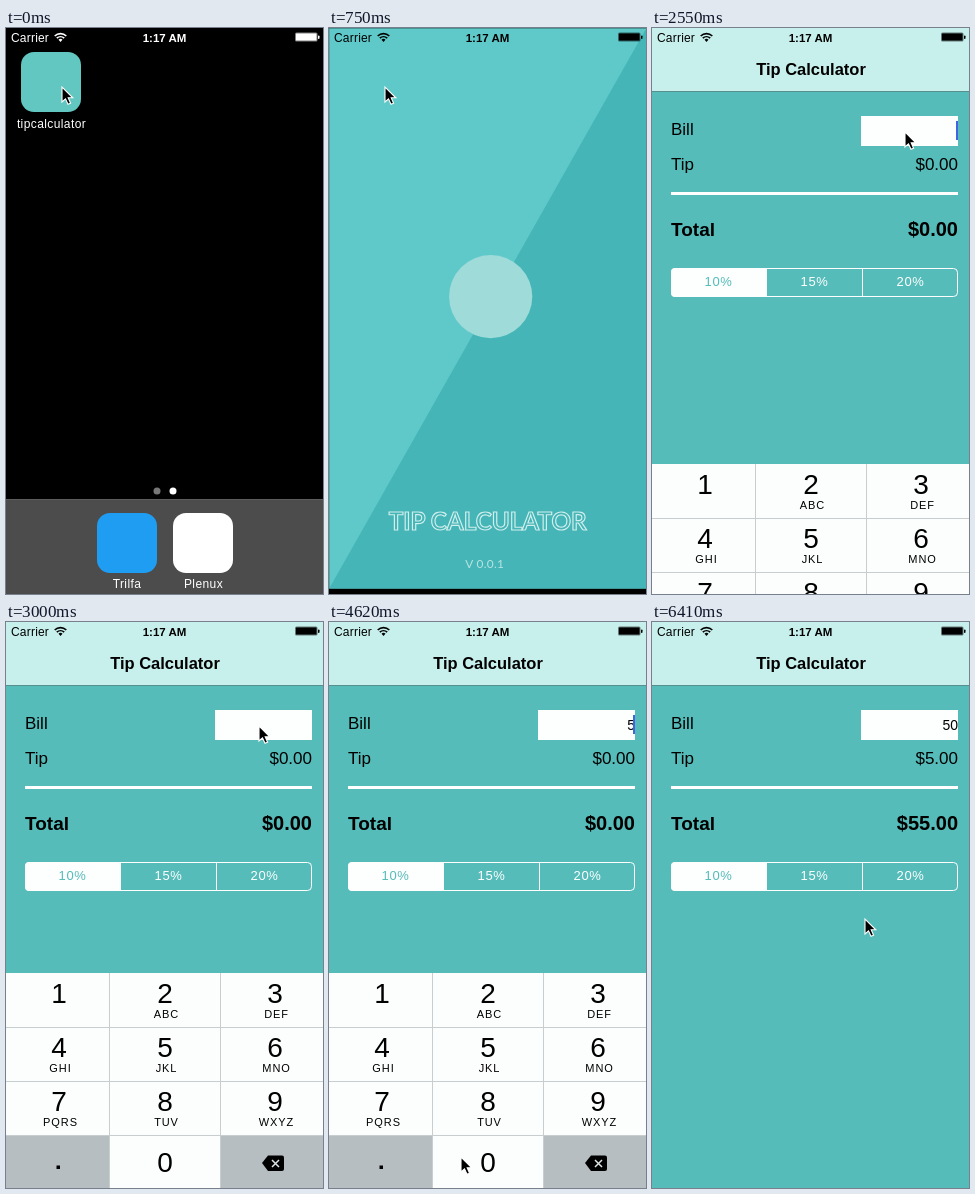
Animation, 317 px wide and 566 px high, one loop 8 s. Source, as an HTML page:

```html
<!DOCTYPE html>
<html lang="en">
<head>
<meta charset="utf-8">
<title>Tip calculator demo</title>
<style>
html, body { margin: 0; width: 100%; height: 100%; overflow: hidden; background: #000; }
svg { display: block; width: 100%; height: 100%; }
text { font-family: "Liberation Sans", Arial, sans-serif; }
.mid { text-anchor: middle; }
.end { text-anchor: end; }
.bold { font-weight: bold; }
.label { font-size: 12px; letter-spacing: .4px; fill: #fff; text-anchor: middle; }
.row { font-size: 17px; }
.seg { font-size: 13px; letter-spacing: .6px; fill: #fff; text-anchor: middle; }
.splash { font-family: Lato, sans-serif; text-anchor: middle; }
.digit { font-size: 28px; text-anchor: middle; }
.letters { font-size: 11px; letter-spacing: .9px; text-anchor: middle; }
</style>
</head>
<body>
<svg viewBox="0 0 317 566">
  <rect width="317" height="566"/>

  <g id="home">
    <rect id="icon" x="15" y="24" width="60" height="60" rx="13"/>
    <text class="label" x="45.5" y="100">tipcalculator</text>
    <circle cx="151" cy="463" r="3.5" fill="#777"/>
    <circle cx="167" cy="463" r="3.5" fill="#fff"/>
    <rect y="471" width="317" height="95" fill="#4c4c4c"/>
    <path d="M0 471.5H317" stroke="#5c5c5c"/>
    <rect x="91" y="485" width="60" height="60" rx="13" fill="#1f9df2"/>
    <rect x="167" y="485" width="60" height="60" rx="13" fill="#fff"/>
    <text class="label" x="121" y="560">Trilfa</text>
    <text class="label" x="197.5" y="560">Plenux</text>
  </g>

  <g id="splash">
    <rect width="320" height="566" fill="#5fc9c9"/>
    <path d="M320 0V566H0Z" fill="#45b5b7"/>
    <circle cx="163" cy="271" r="42" fill="#9edbd9"/>
    <text class="splash bold" x="160" y="507" font-size="24.5" fill="none" stroke="#d3efed" stroke-width="1.2">TIP CALCULATOR</text>
    <text class="splash" x="157" y="545.5" font-size="12" letter-spacing=".3" fill="#b9e4e2">V 0.0.1</text>
  </g>

  <g id="app">
    <rect width="317" height="566" fill="#55bcb9"/>
    <rect width="317" height="63" fill="#c7f0ed"/>
    <path d="M0 63.5H317" stroke="#568f8d"/>
    <text class="mid bold" x="159" y="47" font-size="16.5">Tip Calculator</text>
    <text class="row" x="19" y="107">Bill</text>
    <text class="row" x="19" y="142">Tip</text>
    <text class="bold" x="19" y="208" font-size="19">Total</text>
    <rect x="209" y="88" width="97" height="30" fill="#fdfefe"/>
    <text id="bill" class="end" x="306" y="108" font-size="14"></text>
    <rect id="caret" x="304" y="93" width="2" height="19" fill="#3f66e0"/>
    <text id="tip" class="row end" x="306" y="142"></text>
    <rect x="19" y="164" width="287" height="3" fill="#fff"/>
    <text id="total" class="bold end" x="306" y="208" font-size="20"></text>
    <rect x="19.5" y="240.5" width="286" height="28" rx="4" fill="none" stroke="#fff"/>
    <path d="M115 240V269H23a4 4 0 0 1-4-4V244a4 4 0 0 1 4-4Z" fill="#fdfefe"/>
    <path d="M210.5 240V269" stroke="#fff"/>
    <text class="seg" x="66.5" y="258" style="fill:#55bcb9">10%</text>
    <text class="seg" x="162.5" y="258">15%</text>
    <text class="seg" x="258.5" y="258">20%</text>
    <g id="pad"></g>
  </g>

  <g id="status" fill="currentColor">
    <text x="5" y="14" font-size="12" letter-spacing=".2">Carrier</text>
    <text class="mid bold" x="158.5" y="14" font-size="11.5">1:17 AM</text>
    <path d="M48.7 8a8.4 8.4 0 0 1 11.6 0M50.8 10.2a5.4 5.4 0 0 1 7.4 0"
      fill="none" stroke="currentColor" stroke-width="1.7"/>
    <path d="M52.5 11.7a3 3 0 0 1 4 0L54.5 14Z"/>
    <rect x="289" y="4.5" width="22.5" height="9" rx="1.5" opacity=".5"/>
    <rect x="290" y="5.5" width="20.5" height="7" rx=".5"/>
    <rect x="312" y="7.5" width="1.5" height="3.5" rx=".7"/>
  </g>

  <path id="cursor" d="M0 0V15L3.5 11.8L6 17.3L8.6 16.2L6.2 10.8H10.8Z" stroke="#fff" stroke-width="1.1"/>
</svg>
<script>
const $ = id => document.getElementById(id);
const set = (id, name, value) => $(id).setAttribute(name, value);

const LOOP = 8000, TICK = 148.9;
const FOCUS = 16, TYPED = [28, 34], DONE = 40;
const MOVES = [
  { start: 10, length: 1, x: 75, y: 73 },
  { start: 11, length: 4, x: 253, y: 104 },
  { start: 22, length: 2, x: 138, y: 424 },
  { start: 28, length: 3, x: 132, y: 535 },
  { start: 34, length: 4, x: 213, y: 297 }
];

const lerp = (a, b, p) => a + (b - a) * p;
const money = n => "$" + n.toFixed(2);

// Smooth 0 to 1 over the given span.
function ramp(tick, start, length) {
  const u = Math.min(1, Math.max(0, (tick - start) / length));
  return u * u * (3 - 2 * u);
}

function pointer(tick) {
  let x = 56, y = 59;
  for (const m of MOVES) {
    const p = ramp(tick, m.start, m.length);
    x = lerp(x, m.x, p);
    y = lerp(y, m.y, p);
  }
  return `translate(${Math.round(x)} ${Math.round(y)})`;
}

function buildPad() {
  const centers = [53, 159, 269];
  const names = ["", "ABC", "DEF", "GHI", "JKL", "MNO", "PQRS", "TUV", "WXYZ"];
  const keys = names.map((name, i) => {
    const x = centers[i % 3], y = 351 + 54 * Math.floor(i / 3);
    return `<text class="digit" x="${x}" y="${y + 30}">${i + 1}</text>
      <text class="letters" x="${x + 1.5}" y="${y + 45}">${name}</text>`;
  });
  $("pad").innerHTML = `
    <rect y="351" width="317" height="215" fill="#fcfdfd"/>
    <rect id="pressed" x="104" y="406" width="110" height="53" fill="#b6bec2"/>
    <path d="M0 513H103.5V566H0ZM214 513H317V566H214Z" fill="#b6bec2"/>
    <path d="M0 405.5H317M0 459.5H317M0 513.5H317M103.5 351V566M214.5 351V566"
      stroke="#c8cdd0" fill="none"/>
    ${keys.join("")}
    <text class="digit" x="159" y="550">0</text>
    <rect x="50.5" y="543.5" width="3.5" height="3.5"/>
    <path d="M256 541L262 533.5H276a2 2 0 0 1 2 2V547a2 2 0 0 1-2 2H262Z"/>
    <path d="M266 538L273 545M273 538L266 545" stroke="#dfe4e6" stroke-width="1.5"/>`;
}

function drawLaunch(tick) {
  const p = ramp(tick, 2, 3.2);
  const x = lerp(15, 0, p), y = lerp(24, 0, p);
  const w = lerp(60, 320, p), h = lerp(60, 566, p);
  const kx = w / 60, ky = h / 60;
  set("home", "transform", `translate(${x - 15 * kx} ${y - 24 * ky}) scale(${kx} ${ky})`);
  set("home", "visibility", p < .9 ? "visible" : "hidden");
  set("icon", "fill", tick < 1 ? "#62c6c1" : "#35706d");
  set("splash", "transform", `translate(${x} ${y}) scale(${w / 320} ${h / 566})`);
  set("splash", "visibility", p ? "visible" : "hidden");
  set("status", "color", p < .5 ? "#fff" : "#000");
}

function drawApp(tick) {
  const typed = TYPED.filter(k => k <= tick);
  const bill = "50".slice(0, typed.length);
  const amount = tick < DONE ? 0 : Number(bill);
  $("bill").textContent = bill;
  $("tip").textContent = money(amount * .1);
  $("total").textContent = money(amount * 1.1);

  // The caret restarts its blink with every key.
  const blink = (tick - (typed.at(-1) ?? FOCUS)) % 7;
  const caret = tick >= FOCUS && tick < DONE && blink < 4;
  set("caret", "opacity", caret ? 1 : 0);

  const raised = ramp(tick, 15.5, 2.63) - ramp(tick, DONE - 1, 4);
  set("pad", "transform", `translate(0 ${Math.round(215 * (1 - raised))})`);
  set("pressed", "opacity", tick === TYPED[0] - 1 ? 1 : 0);
  set("app", "opacity", ramp(tick, 6, 2));
}

function draw(t) {
  const tick = Math.floor(t / TICK);
  drawLaunch(tick);
  drawApp(tick);
  set("cursor", "transform", pointer(tick));
}

buildPad();
const start = performance.now();
function loop() {
  draw((performance.now() - start) % LOOP);
  requestAnimationFrame(loop);
}
loop();
</script>
</body>
</html>
```
